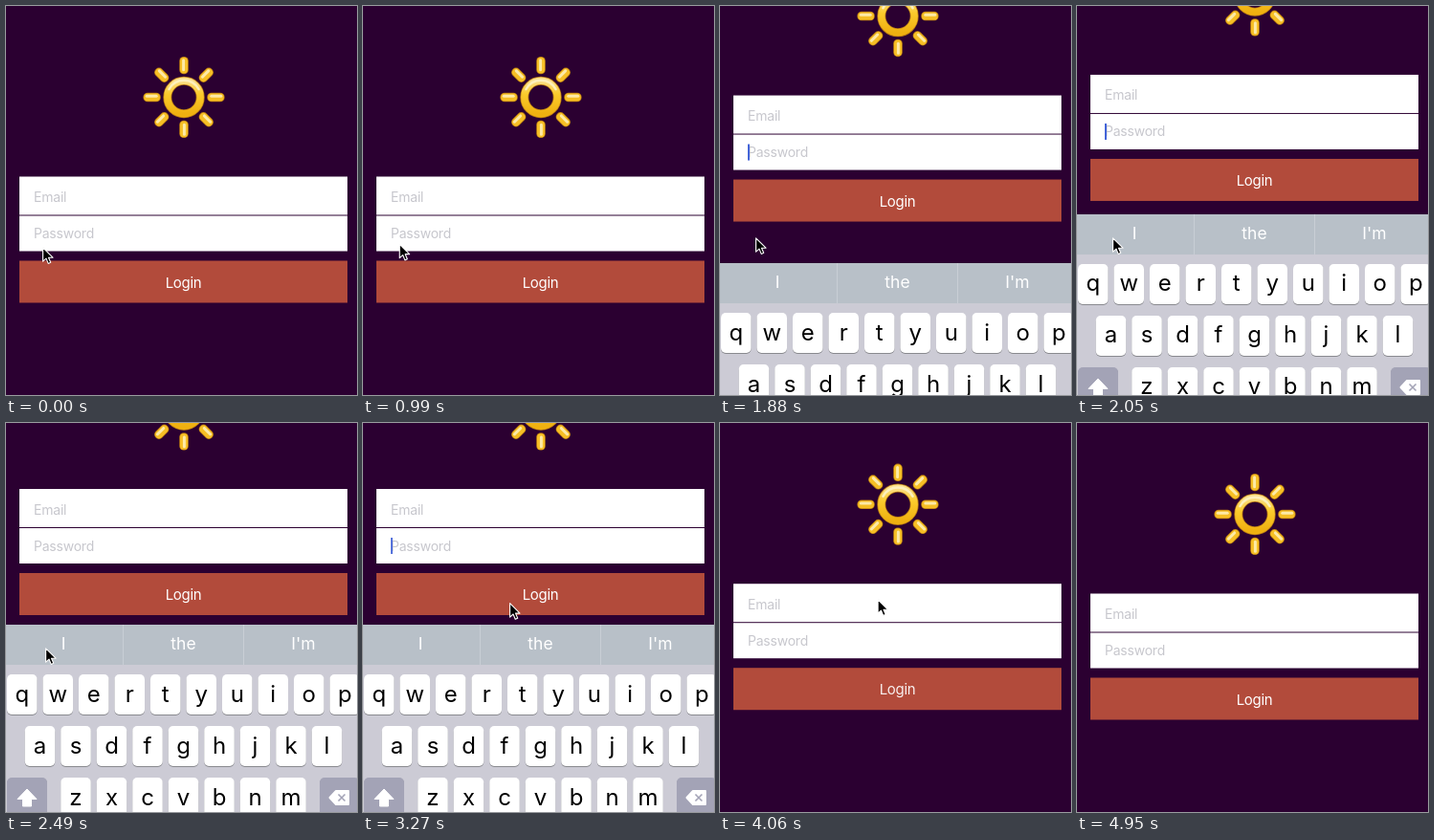
These frames come from a looping animation (367x407 px, 5.93 s). An HTML page:

```html
<!DOCTYPE html>
<html lang="en">
<head>
<meta charset="utf-8">
<title>Login form with keyboard</title>
<style>
  html, body { margin: 0; width: 100%; height: 100%; overflow: hidden; background: #2b0031; }
  svg { display: block; width: 100vw; height: 100vh; }
  text { font-family: Inter, "Open Sans", sans-serif; }
  .hint { font-size: 14px; letter-spacing: -.22px; fill: #c7c7cd; }
  .login { font-size: 15px; letter-spacing: -.3px; fill: #fff; text-anchor: middle; }
  .word { font-size: 17.5px; fill: #fff; text-anchor: middle; }
  .letter { font-size: 24px; fill: #000; text-anchor: middle; }
</style>
</head>
<body>
<svg viewBox="0 0 367 407">
  <defs>
    <linearGradient id="gold" x1="0" y1="0" x2="0" y2="1">
      <stop offset="0" stop-color="#fbe08a"/>
      <stop offset=".4" stop-color="#fbcb2c"/>
      <stop offset="1" stop-color="#efb010"/>
    </linearGradient>
  </defs>
  <rect width="367" height="407" fill="#2b0031"/>
  <g id="page">
    <g id="sun" transform="translate(186 95.5)">
      <g id="rays"></g>
      <circle r="17.2" fill="none" stroke="#b97a12" stroke-width="9"/>
      <circle r="17.2" fill="none" stroke="url(#gold)" stroke-width="7.4"/>
      <path d="M-15.5 -8.5A17.6 17.6 0 0 1 15.5 -8.5" fill="none" stroke="#fdf0bd" stroke-width="2.6" stroke-linecap="round"/>
    </g>
    <g transform="translate(14 178.5)">
      <rect width="343" height="40" fill="#fff"/>
      <rect y="41" width="343" height="37" fill="#fff"/>
      <rect y="88" width="343" height="44" fill="#b24b3b"/>
      <text class="hint" x="15" y="26.5">Email</text>
      <text class="hint" x="15" y="64.5">Password</text>
      <rect id="caret" x="15" y="51" width="2" height="17" fill="#4364d8"/>
      <text class="login" id="login" x="171.5" y="116">Login</text>
    </g>
  </g>
  <g id="keyboard"></g>
  <path id="pointer" d="M.6 .8V15.2L4 12.1L6.2 17.4L8.7 16.3L6.5 11.2H11Z" fill="#000" stroke="#fff" stroke-width="1.1" stroke-linejoin="round"/>
</svg>
<script>
const LOOP = 5930, STEP = 87.57, PHASE = 1710, LEAD = 25;
const LIFT = 109.5, KEYS_TOP = 211, KEYS_HEIGHT = 259;
const $ = id => document.getElementById(id);

function add(parent, tag, attrs, text) {
  const el = document.createElementNS(parent.namespaceURI, tag);
  for (const k in attrs) el.setAttribute(k, attrs[k]);
  if (text) el.textContent = text;
  parent.appendChild(el);
  return el;
}

function buildRays() {
  for (let a = 0; a < 360; a += 45) {
    const ray = add($('rays'), 'g', { transform: `rotate(${a})` });
    const tall = a % 90 ? 17.4 : 18.4;
    add(ray, 'rect', { x: -4.8, y: -24.2 - tall, width: 9.6, height: tall, rx: 4.6, fill: '#b97a12' });
    add(ray, 'rect', { x: -4, y: -23.4 - tall, width: 8, height: tall - 1.6, rx: 3.9, fill: '#f6bf25' });
    // highlight on the side that faces up
    const lit = a > 0 && a < 180 ? -1.3 : a > 180 ? 1.3 : -.4;
    add(ray, 'rect', { x: lit - 1.5, y: -21.8 - tall, width: 3, height: tall - 5.5, rx: 1.5, fill: '#fdeaa6' });
  }
}

function addKey(board, x, y, width, fill) {
  add(board, 'rect', { x, y: y + 1, width, height: 42, rx: 5, fill: '#898a8f' });
  add(board, 'rect', { x, y, width, height: 42, rx: 5, fill });
}

function buildKeyboard() {
  const board = $('keyboard');
  add(board, 'rect', { width: 367, height: KEYS_HEIGHT, fill: '#cccbd5' });
  add(board, 'rect', { width: 367, height: 42, fill: '#b8c0c8' });
  for (const x of [122, 248]) add(board, 'rect', { x, width: 1, height: 42, fill: '#c8ced5' });
  ['I', 'the', "I'm"].forEach((w, i) =>
    add(board, 'text', { class: 'word', x: 60 + i * 125.5, y: 26 }, w));

  const rows = [['qwertyuiop', 1], ['asdfghjkl', 19.75], ['zxcvbnm', 57.25]];
  rows.forEach(([letters, left], r) => {
    [...letters].forEach((ch, i) => {
      const x = left + i * 37.5, y = 52 + r * 54;
      addKey(board, x, y, 31.5, '#fff');
      add(board, 'text', { class: 'letter', x: x + 15.75, y: y + 28.5 }, ch);
    });
  });
  const grey = '#a3a3b6';
  addKey(board, 1, 160, 42, grey);
  addKey(board, 328, 160, 42, grey);
  add(board, 'path', { d: 'M22 172L32 182.5H26.5V190H17.5V182.5H12Z', fill: '#fff', stroke: '#fff', 'stroke-linejoin': 'round' });
  add(board, 'path', { d: 'M338.5 181L345 174H358V188H345Z', fill: '#fff', stroke: '#fff', 'stroke-width': 2, 'stroke-linejoin': 'round' });
  add(board, 'path', { d: 'M347.5 177.5L354.5 184.5M354.5 177.5L347.5 184.5', stroke: grey, 'stroke-width': 1.6 });
}

const ramp = (t, from, to) => Math.min(1, Math.max(0, (t - from) / (to - from)));
const smooth = u => u * u * (3 - 2 * u);

// critically damped spring, rate per second
function spring(t, start, rate) {
  const s = Math.max(0, t - start) / 1000 * rate;
  return s > 8 ? 1 : 1 - (1 + s) * Math.exp(-s);
}

// time, x, y, easing into the point
const easeIn = u => u * u, easeOut = u => u * (1.6 - .6 * u), linear = u => u;
const track = [
  [834, 38, 252, linear], [1272, 37, 242, smooth], [2235, 37, 242, linear],
  [2498, 41, 235, easeIn], [2848, 94, 208, linear], [3461, 164.5, 184, easeOut],
  [4249, 164.5, 184, linear], [4862, 327, 401, smooth], [4949, 345, 425, linear]
];

function pointerAt(t) {
  let [x, y] = [track[0][1], track[0][2]];
  for (let i = 1; i < track.length && t > track[i - 1][0]; i++) {
    const [t0, x0, y0] = track[i - 1], [t1, x1, y1, ease] = track[i];
    const u = ease(ramp(t, t0, t1));
    x = x0 + (x1 - x0) * u;
    y = y0 + (y1 - y0) * u;
  }
  return [x, y];
}

function caretAt(t) {
  if (t < 1700 || t > 3700) return 0;
  return 1 - ramp(t, 2290, 2440) + ramp(t, 2690, 2840) - ramp(t, 3270, 3430);
}

function draw(time) {
  const t = PHASE + Math.floor((time - PHASE + LEAD) / STEP) * STEP;
  const up = spring(t, 1697, 15.1) - spring(t, 3876, 20);
  $('page').setAttribute('transform', `translate(0 ${-LIFT * up})`);
  $('keyboard').setAttribute('transform', `translate(0 ${KEYS_TOP + KEYS_HEIGHT * (1 - up)})`);
  $('caret').setAttribute('opacity', caretAt(t));
  $('login').setAttribute('opacity',
    1 - .8 * (smooth(ramp(t, 3690, 3840)) - smooth(ramp(t, 3876, 4126))));
  $('pointer').setAttribute('transform', `translate(${pointerAt(t)})`);
}

buildRays();
buildKeyboard();
const begin = performance.now();
function tick() {
  draw((performance.now() - begin) % LOOP);
  requestAnimationFrame(tick);
}
tick();
</script>
</body>
</html>
```
